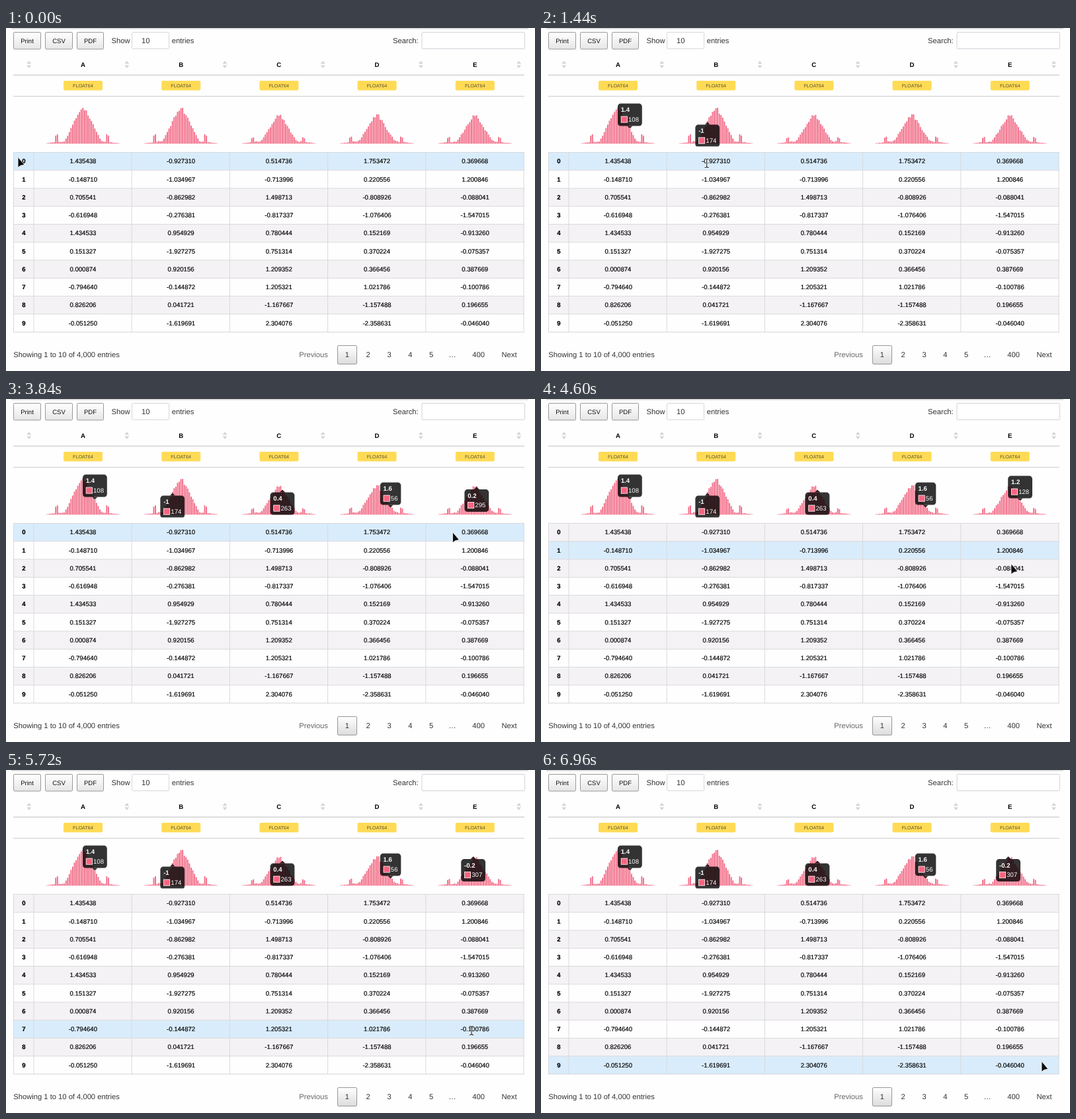
Write an HTML page that moves like this. It is 800 px wide and 520 px high and loops after 7 s.

```html
<!DOCTYPE html>
<html lang="en">
<head>
<meta charset="utf-8">
<title>Data table</title>
<style>
html, body { margin: 0; width: 800px; height: 520px; overflow: hidden; background: #fefefe; }
svg { display: block; font-family: "Liberation Sans", Arial, sans-serif; text-rendering: geometricPrecision; }
.cell { stroke: #000; stroke-width: .18px; }
</style>
</head>
<body>
<svg id="stage" width="800" height="520" viewBox="0 0 800 520"></svg>
<script>
const LOOP = 7000, LAG = 60;
const TOP = 188.5, ROW = 27.25, LEFT = 42, COL = 148.2, PINK = '#f8647f';
const BIN = 2.57, BASE = 175;
const data = [
  '1.435438 -0.927310 0.514736 1.753472 0.369668',
  '-0.148710 -1.034967 -0.713996 0.220556 1.200846',
  '0.705541 -0.862982 1.498713 -0.808926 -0.088041',
  '-0.616948 -0.276381 -0.817337 -1.076406 -1.547015',
  '1.434533 0.954929 0.780444 0.152169 -0.913260',
  '0.151327 -1.927275 0.751314 0.370224 -0.075357',
  '0.000874 0.920156 1.209352 0.366456 0.387669',
  '-0.794640 -0.144872 1.205321 1.021786 -0.100786',
  '0.826206 0.041721 -1.167667 -1.157488 0.196655',
  '-0.051250 -1.619691 2.304076 -2.358631 -0.046040'
].map(line => line.split(' '));

// Histogram shape per column: peak height and side bump height
const shapes = [[59, 14], [58, 14], [46, 9.5], [46, 10.5], [45, 10]];

// Tooltip per column: bin -> [count, bar top]
const tips = [
  { 1.4: [108, 153] },
  { '-1': [174, 143] },
  { 0.4: [263, 138] },
  { 1.6: [56, 165] },
  { 0.2: [295, 133.5], 1.2: [128, 155], '-0.2': [307, 131.5],
    '-1.6': [74, 163], '-1': [176, 149], 0: [301, 132] }
];

// Pointer path: time, x, y
const path = [
  [0, 18, 196], [360, 34, 198], [720, 78, 201], [1360, 246, 204], [1440, 250.5, 205],
  [2000, 360, 203], [2720, 487, 200], [3600, 620, 201], [4000, 712, 203],
  [4300, 722, 206], [4400, 720, 213], [4540, 713, 241], [4600, 711, 250],
  [5240, 704, 334], [5720, 704, 395], [6040, 706, 425], [6300, 712, 440],
  [6960, 757, 442], [7000, 757, 442]
];

const stage = document.getElementById('stage');
const centre = c => LEFT + COL * (c + .5) + .3;
const rect = (x, y, w, h, fill, more = '') =>
  `<rect x="${x}" y="${y}" width="${w}" height="${h}" fill="${fill}" ${more}/>`;
const line = (x1, y1, x2, y2, color, width = 1) =>
  `<path d="M${x1} ${y1}L${x2} ${y2}" stroke="${color}" stroke-width="${width}"/>`;
const text = (x, y, str, size = 11.2, anchor = 'start', fill = '#333', weight = 400) =>
  `<text x="${x}" y="${y}" font-size="${size}" text-anchor="${anchor}" fill="${fill}" font-weight="${weight}">${str}</text>`;
const noise = n => { const s = Math.sin(n * 127.1) * 43758.5453; return s - Math.floor(s); };

function controls() {
  let out = line(8, .8, 790, .8, '#ccc', 1.2);
  [['Print', 11.5, 41], ['CSV', 59.5, 41], ['PDF', 107.5, 40]].forEach(([name, x, w]) => {
    out += rect(x, 6.5, w, 25.5, 'url(#button)', 'stroke="#999" rx="1.6"');
    out += text(x + w / 2, 22.5, name, 9.6, 'middle', '#111');
  });
  out += text(159.5, 22.5, 'Show') + rect(190.5, 6.5, 56, 25, '#fff', 'stroke="#d8d8dc" rx="1"');
  out += text(205, 22.7, '10') + text(250.7, 22.5, 'entries') + text(585, 22.9, 'Search:');
  return out + rect(629, 6.5, 155.5, 25, '#fff', 'stroke="#d4d4da" rx="1"');
}

function sortIcon(x) {
  return `<path d="M${x - 3.5} 54.3h7l-3.5 -4.5zM${x - 3.5} 56.5h7l-3.5 4.5z" fill="#d4d4da"/>`;
}

function histogram(c) {
  const [peak, bump] = shapes[c], mid = centre(c);
  let out = '';
  for (let i = -21; i <= 21; i++) {
    const d = i * BIN, side = Math.abs(i), n = noise(i + 61 * c + 9);
    let h = peak * Math.min(1, 1.05 - Math.abs(d) / 28) * (.89 + .12 * n);
    if (side > 10) h = .5 + (21 - side) * (.2 + .25 * n);
    if (i === -15 || i === 14) h = bump;
    if (i === -16 || i === 15) h = bump * .85;
    out += rect((mid + d - 1).toFixed(2), (BASE + .2 - h).toFixed(2), 1.9, h.toFixed(2), '#f26c87');
  }
  return out + line(mid - 56, BASE, mid + 56, BASE, 'rgba(255,99,132,.4)', .6);
}

function table() {
  let out = sortIcon(34.8);
  for (let c = 0; c < 5; c++) {
    const x = centre(c);
    out += text(x, 58.5, 'ABCDE'[c], 9.6, 'middle', '#000', 700) + sortIcon(x + 66.4);
    out += rect(x - 29.4, 80, 59, 14.4, '#ffdb55', 'rx="1.8"');
    out += text(x, 89.9, 'FLOAT64', 7.2, 'middle', '#5a5030') + histogram(c);
  }
  out += line(11, 71.3, 784, 71.3, '#ccc', 1.2) + line(11, 103.5, 784, 103.5, '#ccc', 1.2);
  let cells = '';
  data.forEach((values, r) => {
    const y = TOP + r * ROW, base = y + ROW / 2 + 3.2;
    out += rect(11.5, y, 772, ROW, '#fff', 'class="row"') + line(11, y, 784, y, '#d9d9dc');
    cells += text(26.8, base, r, 9.6, 'middle', '#000', 700);
    values.forEach((v, c) => cells += text(centre(c), base, v, 9.6, 'middle', '#000'));
  });
  const bottom = TOP + 10 * ROW;
  out += line(11, bottom, 784, bottom, '#d4d4d8') + line(11.5, TOP, 11.5, bottom, '#d9d9dc');
  for (let c = 0; c < 6; c++) out += line(LEFT + c * COL, TOP, LEFT + c * COL, bottom, '#d9d9dc');
  return out + `<g class="cell">${cells}</g>`;
}

function footer() {
  let out = text(11.3, 498.6, 'Showing 1 to 10 of 4,000 entries');
  out += rect(501.5, 481.5, 29, 28, 'url(#page)', 'stroke="#979797" rx="1.6"');
  out += text(465, 499.3, 'Previous', 11.2, 'middle', '#666');
  ['1', '2', '3', '4', '5', '…'].forEach((p, i) =>
    out += text(515.8 + i * 31.85, 499.3, p, 11.2, 'middle'));
  return out + text(714.6, 499.3, '400', 11.2, 'middle') + text(761, 499.3, 'Next', 11.2, 'middle');
}

const gradient = (id, end) =>
  `<linearGradient id="${id}" x2="0" y2="1"><stop stop-color="#fff"/><stop offset="1" stop-color="${end}"/></linearGradient>`;

stage.innerHTML = `<defs>${gradient('button', '#e6e6e6')}${gradient('page', '#dcdcdc')}
  <clipPath id="charts">${rect(0, 104, 800, 75.5, '#000')}</clipPath></defs>
  ${controls()}${table()}${footer()}<g id="tips" clip-path="url(#charts)"></g><g id="pointer"></g>`;
const rows = [...document.querySelectorAll('.row')];
const tipLayer = document.getElementById('tips'), pointer = document.getElementById('pointer');

function tooltip(c, row) {
  const bin = Math.floor(data[row][c] * 5) / 5;
  const [count, y] = tips[c][bin];
  const x = centre(c) + bin * 5 * BIN, w = 20.8 + String(count).length * 5.34;
  const left = x - w / 2, above = y > 148, top = above ? y - 38.4 : y + 3.6;
  const caret = above ? `M${x - 4} ${top + 34}h8l-4 4z` : `M${x - 4} ${top}h8l-4 -4z`;
  return `<g fill-opacity=".8">${rect(left, top, w, 34, '#000', 'rx="4.5"')}<path d="${caret}"/></g>`
    + text(left + 4.8, top + 12.6, bin, 9.6, 'start', '#fff', 700)
    + rect(left + 5.2, top + 19.4, 9.2, 9.2, PINK, 'stroke="#fff" stroke-width=".8"')
    + text(left + 16, top + 27.2, count, 9.6, 'start', '#fff');
}

function position(t) {
  const i = path.findIndex(p => p[0] > t);
  const [t0, x0, y0] = path[i - 1], [t1, x1, y1] = path[i], k = (t - t0) / (t1 - t0);
  return [x0 + (x1 - x0) * k, y0 + (y1 - y0) * k];
}

const arrow = '<path d="M0 -.4V15.6L4.2 12.5L10 11.4Z" fill="#0c0c0c" stroke="#fff" stroke-width=".8" stroke-linejoin="round"/>';
const beamPath = 'M-3 -6.5Q0 -6.5 0 -5Q0 -6.5 3 -6.5M0 -5V5M-3 6.5Q0 6.5 0 5Q0 6.5 3 6.5';
const beam = `<path d="${beamPath}" fill="none" stroke="#fff" stroke-width="2.4"/>
  <path d="${beamPath}" fill="none" stroke="#222" stroke-width="1.1"/>`;
let shown = '';

function draw(now) {
  const t = now % LOOP, [x, y] = position(t);
  // The page reacts slightly behind the pointer
  const [hx, hy] = position(Math.max(0, t - LAG));
  const row = Math.floor((hy - TOP) / ROW), col = Math.floor((hx - LEFT) / COL);
  const overText = col >= 0 && Math.abs(hx - centre(col)) < 21.8
    && Math.abs(hy - TOP - (row + .5) * ROW) < 6.5;
  const state = [row, col, overText].join();
  if (state !== shown) {
    shown = state;
    rows.forEach((r, i) => r.setAttribute('fill', i === row ? '#d9ecfb' : i % 2 ? '#fefefe' : '#f4f2f4'));
    let out = '';
    for (let c = 0; c <= col; c++) out += tooltip(c, c < 4 ? 0 : row);
    tipLayer.innerHTML = out;
    pointer.innerHTML = overText ? beam : arrow;
  }
  pointer.setAttribute('transform', `translate(${x.toFixed(2)} ${y.toFixed(2)})`);
  requestAnimationFrame(() => draw(performance.now()));
}
draw(0);
</script>
</body>
</html>
```
